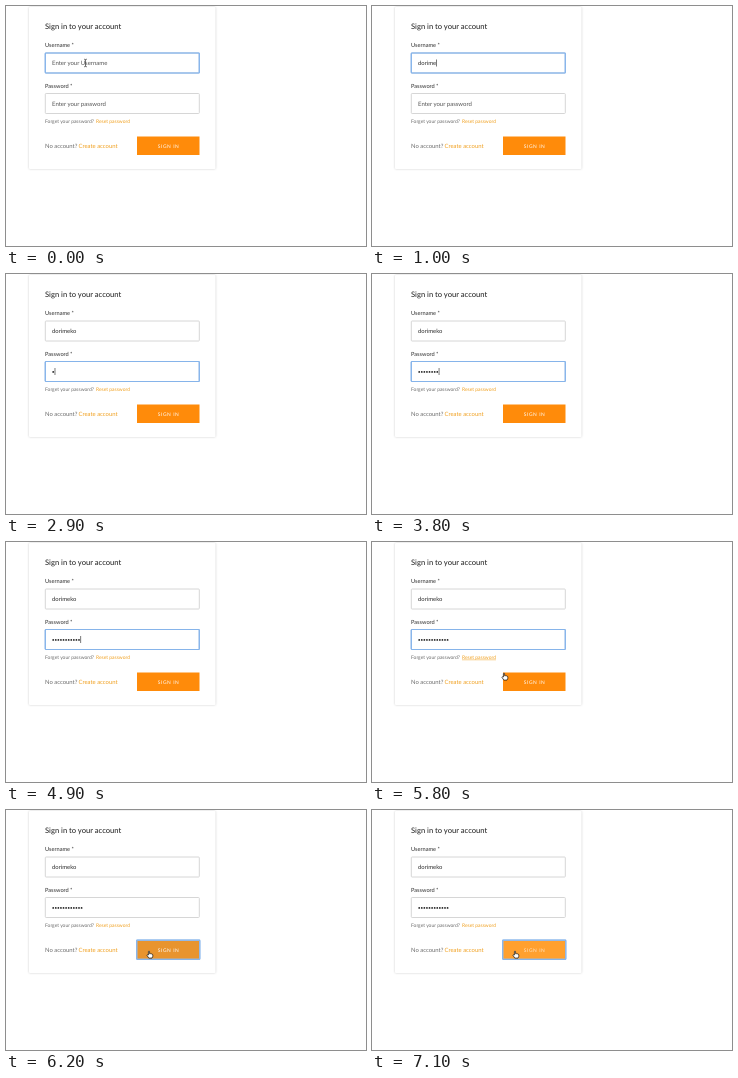
Animation, 360 px wide and 240 px high, one loop 8000 ms. Source, as an HTML page:

```html
<!DOCTYPE html>
<html lang="en">
<head>
<meta charset="utf-8">
<title>Sign in</title>
<style>
  html, body { margin: 0; width: 100%; height: 100%; overflow: hidden; background: #fff; }
  svg { display: block; width: 360px; height: 240px; }
  text { font: 5.9px Lato, "Open Sans", sans-serif; fill: #2c2c2c; text-rendering: geometricPrecision; white-space: pre; }
  .title { font-size: 7.6px; font-weight: 500; }
  .label { font-size: 5.65px; }
  .hint { font-size: 6px; fill: #555; }
  .small { font-size: 4.95px; }
  .grey { fill: #6c6c6c; }
  .link { fill: #f0a020; }
  .sign { font-size: 4.9px; letter-spacing: .55px; }
  .card { fill: #fff; filter: drop-shadow(0 .5px 1.2px #0003); }
  .field { fill: #fff; stroke: #d2d2d2; stroke-width: .9; }
  .ring { fill: none; stroke: #86b4ea; stroke-width: 1.2; filter: drop-shadow(0 0 .7px #a9cbf4); }
</style>
</head>
<body>
<svg viewBox="0 0 360 240">
  <rect class="card" x="23" y="1" width="186.5" height="162" rx="1"/>
  <text class="title" x="39" y="23.1">Sign in to your account</text>
  <text class="label" x="39" y="41.2">Username *</text>
  <text class="label" x="39" y="81.6">Password *</text>
  <rect class="field" x="39.3" y="47" width="154" height="20" rx=".8"/>
  <rect class="field" x="39.3" y="87.5" width="154" height="20" rx=".8"/>
  <rect class="ring" id="userRing" x="39.3" y="47" width="154" height="20" rx=".8"/>
  <rect class="ring" id="passRing" x="39.3" y="87.5" width="154" height="20" rx=".8"/>
  <text class="hint" id="userHint" x="46" y="59.1">Enter your Username</text>
  <text id="user" x="46" y="59.1"></text>
  <text class="hint" id="passHint" x="46" y="99.5">Enter your password</text>
  <g id="dots" fill="#222"></g>
  <rect id="caret" width=".6" height="7" fill="#222"/>
  <text class="small grey" x="39" y="116.8">Forget your password?</text>
  <text class="small link" x="90" y="116.8">Reset password</text>
  <path id="underline" d="M90 117.8h34" stroke="#f0a020" stroke-width=".5"/>
  <text class="grey" x="39" y="141.6">No account?</text>
  <text class="link" x="72.5" y="141.6">Create account</text>
  <rect id="button" x="131" y="130.5" width="62.5" height="18.5"/>
  <rect class="ring" id="buttonRing" x="130.7" y="130.2" width="63.1" height="19.1" rx=".5"/>
  <text class="sign" id="sign" x="151.8" y="141.6">SIGN IN</text>
  <path id="beam" d="M-1.3-3.8Q0-3.8 0-3Q0-3.8 1.3-3.8M0-3V3M-1.3 3.8Q0 3.8 0 3Q0 3.8 1.3 3.8" fill="none" stroke="#333" stroke-width=".7"/>
  <path id="hand" d="M-1.6 .5V-2.7Q-1.6-3.4-1-3.4T-.4-2.7V-.7Q.3-1.3.8-.6Q1.5-1 1.9-.3Q2.8-.4 2.8.6V1.8L2 3.6H-1.2L-3 .9Q-3.1-.2-1.6.5Z" fill="#fff" stroke="#111" stroke-width=".7"/>
</svg>
<script>
const $ = id => document.getElementById(id);
const LOOP = 8000, NAME = "dorimeko", PITCH = 2.58;
const userKeys = [400, 500, 600, 800, 900, 1000, 1100, 1200];
const passKeys = [2800, 3000, 3100, 3300, 3400, 3600, 3700, 3800, 4000, 4100, 4500, 5000];
// time, x, y of the pointer
const path = [[5500, 96, 97], [5600, 108, 106], [5700, 120, 116], [5800, 133, 134.5], [5900, 139, 140], [6000, 144, 144.5]];
// time, then button red, green, blue
const shades = [[5800, 255, 139, 10], [6200, 232, 148, 46], [6400, 232, 148, 46], [7100, 255, 160, 46]];

const show = (id, amount) => $(id).setAttribute("opacity", +amount);
const typed = (keys, t) => keys.filter(k => k <= t).length;
const clamp = v => Math.max(0, Math.min(1, v));

function sample(rows, t) {
  const i = rows.findIndex(r => r[0] > t);
  if (i < 0) return rows.at(-1).slice(1);
  if (!i) return rows[0].slice(1);
  const a = rows[i - 1], b = rows[i], p = (t - a[0]) / (b[0] - a[0]);
  return a.slice(1).map((v, k) => v + (b[k + 1] - v) * p);
}

$("dots").innerHTML = passKeys.map((_, i) =>
  `<circle cx="${47.2 + i * PITCH}" cy="97.9" r=".9"/>`).join("");

function draw(now) {
  const t = Math.floor(now % LOOP / 100) * 100;
  const inUser = t < 1900, inPass = !inUser && t < 6100;

  // focus
  const enter = clamp(.9 + (t - 1900) / 2000), leave = clamp((t - 6000) / 200);
  show("userRing", inUser ? 1 : 1 - enter);
  show("passRing", inUser ? 0 : enter * (1 - leave));
  show("buttonRing", leave);

  // typing
  const n = typed(userKeys, t), m = typed(passKeys, t);
  $("user").textContent = NAME.slice(0, n);
  show("userHint", !n);
  show("passHint", !m);
  [...$("dots").children].forEach((dot, i) => dot.setAttribute("opacity", +(i < m)));

  // caret blinks half a second after the last key
  const last = [300, 1900, ...userKeys, ...passKeys].filter(k => k <= t).sort((a, b) => a - b).pop();
  show("caret", t >= 300 && t - last < 500 && (inUser || inPass));
  $("caret").setAttribute("x", inUser ? 46 + (n ? $("user").getComputedTextLength() : 0) : 46.1 + m * PITCH);
  $("caret").setAttribute("y", inUser ? 53.5 : 94);

  // pointer and hover
  const [x, y] = t < 300 ? [79.5, 57] : sample(path, t);
  const overText = t < 300 || t >= 5500 && y < 108;
  for (const id of ["beam", "hand"]) $(id).setAttribute("transform", `translate(${x} ${y})`);
  show("beam", overText);
  show("hand", t >= 5500 && !overText);
  show("underline", t >= 5700 && t < 5900);

  // button
  $("button").setAttribute("fill", `rgb(${sample(shades, t).map(Math.round)})`);
  $("sign").style.fill = t < 6500 ? "#fff" : "#ffe6c8";
}

function frame(now) {
  draw(now);
  requestAnimationFrame(frame);
}
draw(0);
requestAnimationFrame(frame);
</script>
</body>
</html>
```
